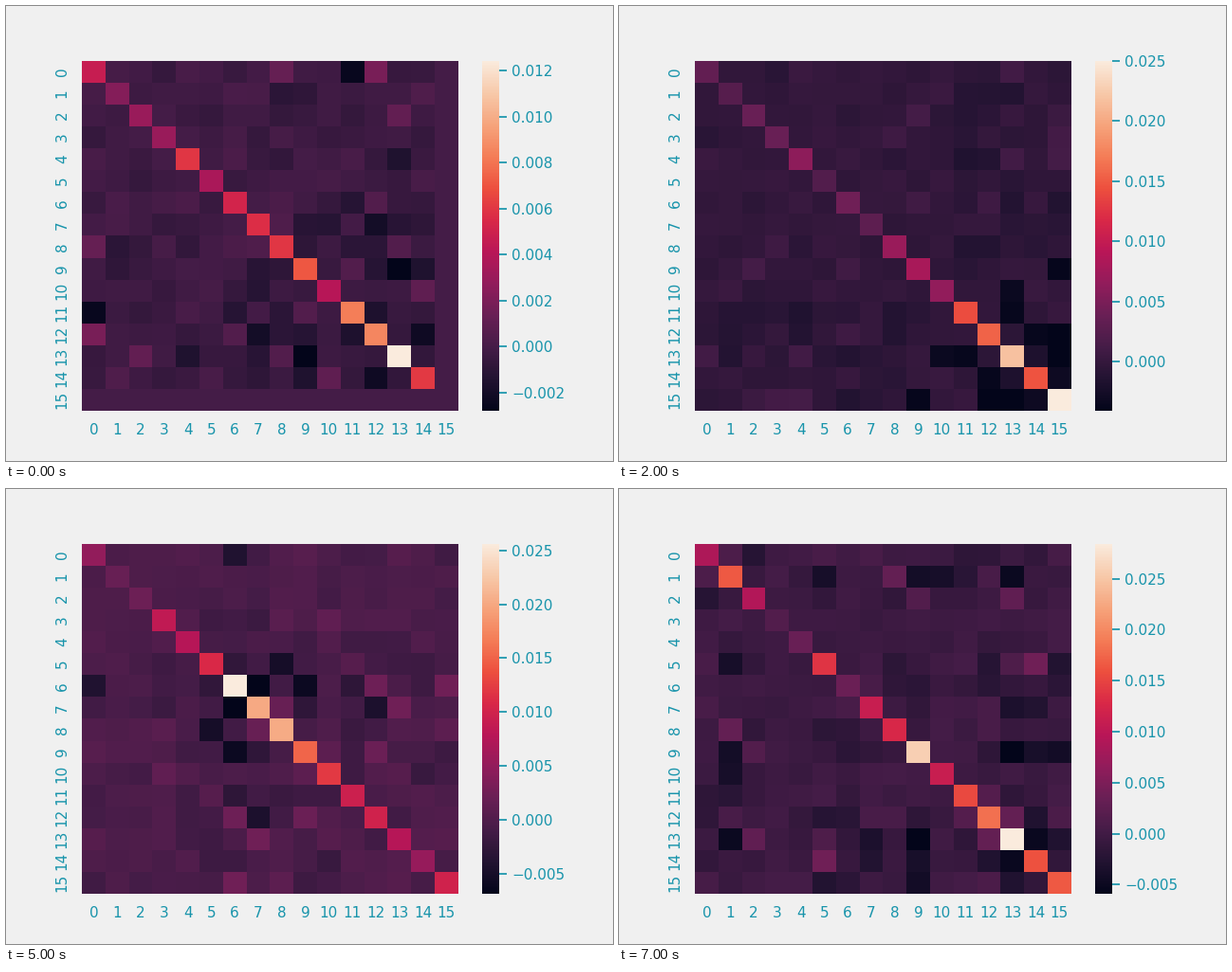
A matplotlib script for the animation above (8000 ms loop, 640 by 480 pixels).

```python
import numpy as np
import matplotlib.pyplot as plt
from matplotlib.animation import FuncAnimation
from matplotlib.colors import LinearSegmentedColormap

N = 16
PAPER, INK = "#f0f0f0", "#1894ab"

plt.rcParams.update({
    "font.family": "DejaVu Sans",
    "figure.facecolor": PAPER, "axes.facecolor": PAPER,
    "xtick.color": INK, "ytick.color": INK,
    "xtick.labelsize": 11, "ytick.labelsize": 11,
    "xtick.major.size": 6, "ytick.major.size": 6,
    "xtick.major.width": 1.25, "ytick.major.width": 1.25,
})

# Dark violet to cream, in even steps
CMAP = LinearSegmentedColormap.from_list("ember", [
    "#03051a", "#221331", "#451c47", "#691f55", "#921c5b", "#b91657",
    "#d92847", "#ed503e", "#f47d57", "#f6a47c", "#f7c9aa", "#faebdd"])


def covariance(seed, variances, links):
    """Weak random correlations scaled by the variances, plus a few links."""
    rng = np.random.default_rng(seed)
    spread = np.sqrt(np.outer(variances, variances))
    upper = np.triu(spread * rng.normal(-0.06, 0.08, (N, N)), 1)
    for cell, value in links.items():
        upper[cell] = value
    return upper + upper.T + np.diag(variances)


# All values are in units of 1e-3
calm = covariance(
    1, [4.7, 2.3, 3, 3, 6, 3.6, 5.2, 5.7, 6, 7.1, 4.1, 8.3, 8.6, 12.4, 6.1, 0],
    {(0, 8): 1.2, (0, 11): -2.5, (0, 12): 1.9, (2, 13): 1.1, (7, 12): -2,
     (9, 13): -2.8, (10, 14): 1, (12, 14): -2.2})

tail = covariance(
    2, [3.3, 2.4, 3.8, 3.8, 6.2, 2.2, 4.2, 3, 7, 8, 6.5, 14.2, 15.5, 21.8,
        14.6, 25],
    {(0, 13): 1, (2, 9): 1.2, (3, 15): 1.1, (4, 15): 1.2, (9, 15): -3.8,
     (10, 13): -3.4, (11, 13): -3.7, (12, 14): -3.7, (13, 15): -4.1})

corner = covariance(
    3, [6.6, 6.9, 3.2, 3.7, 2, 1.1, 4.3, 3.8, 7.3, 10.4, 5.9, 11.3, 17.9,
        18.8, 15, 18.2],
    {(0, 13): 1.6, (1, 13): -3.4, (1, 15): 2.9, (8, 14): 1.8, (9, 14): -3.5,
     (11, 12): -4, (12, 15): -4.1, (13, 14): -3.7, (14, 15): -4.1})

broad = covariance(
    4, [3.6, 10.9, 8.2, 13.6, 18.8, 10.7, 6.6, 2.8, 7.6, 3.4, 3.8, 14.9, 13,
        16.9, 9.8, 17.5],
    {(1, 12): -4, (1, 15): 5.1, (2, 15): -3.9, (3, 11): 3.6, (3, 13): -4.3,
     (4, 12): 2, (5, 11): 1.9, (11, 15): -4.2, (13, 15): -4.2})

middle = covariance(
    5, [5, 1.8, 2.2, 8.6, 7.6, 10.8, 25.6, 20.1, 20.2, 15.2, 12.1, 9.6, 10,
        7.6, 5.2, 9.9],
    {(0, 6): -4, (5, 8): -5, (6, 7): -6.8, (6, 9): -5.9, (6, 12): 2.3,
     (6, 15): 2.4, (7, 12): -4.4, (7, 13): 2.5, (9, 12): 2.1})

paired = covariance(
    6, [8.8, 16.6, 9.2, 1.5, 3.4, 13.8, 3.6, 11, 12.6, 25.8, 11, 15.3, 18.2,
        28.4, 16, 16.5],
    {(1, 5): -3.8, (1, 8): 3, (1, 10): -3.9, (1, 13): -5, (2, 13): 2.8,
     (5, 14): 3.9, (9, 13): -5.9, (9, 15): -4.3, (12, 13): 3, (13, 14): -5.2})

# (matrix, lowest, highest), one per second
STEPS = [
    (calm, -2.79, 12.43),
    ((calm + tail) / 2, -5.0, 21.5),
    (tail, -4.12, 25.02),
    (corner, -4.11, 18.84),
    (broad, -4.26, 18.84),
    (middle, -6.87, 25.62),
    ((middle + paired) / 2, -6.4, 27.0),
    (paired, -5.92, 28.43),
]

fig, ax = plt.subplots(figsize=(6.4, 4.8), dpi=100)
mesh = ax.pcolormesh(calm / 1000, cmap=CMAP, antialiased=False)
bar = fig.colorbar(mesh, ax=ax)
bar.outline.set_linewidth(0)

ax.set(xlim=(0, N), ylim=(N, 0))
ax.spines[:].set_visible(False)
ax.tick_params(bottom=False, left=False)
ax.set_xticks(np.arange(N) + 0.5, range(N))
ax.set_yticks(np.arange(N) + 0.5, range(N), rotation="vertical", va="center")


def draw(i):
    matrix, low, high = STEPS[i]
    mesh.set_array(matrix / 1000)
    mesh.set_clim(low / 1000, high / 1000)
    return [mesh]


anim = FuncAnimation(fig, draw, frames=len(STEPS), interval=1000,
                     init_func=lambda: draw(0), repeat=True, repeat_delay=0,
                     blit=False)
plt.show()
```
